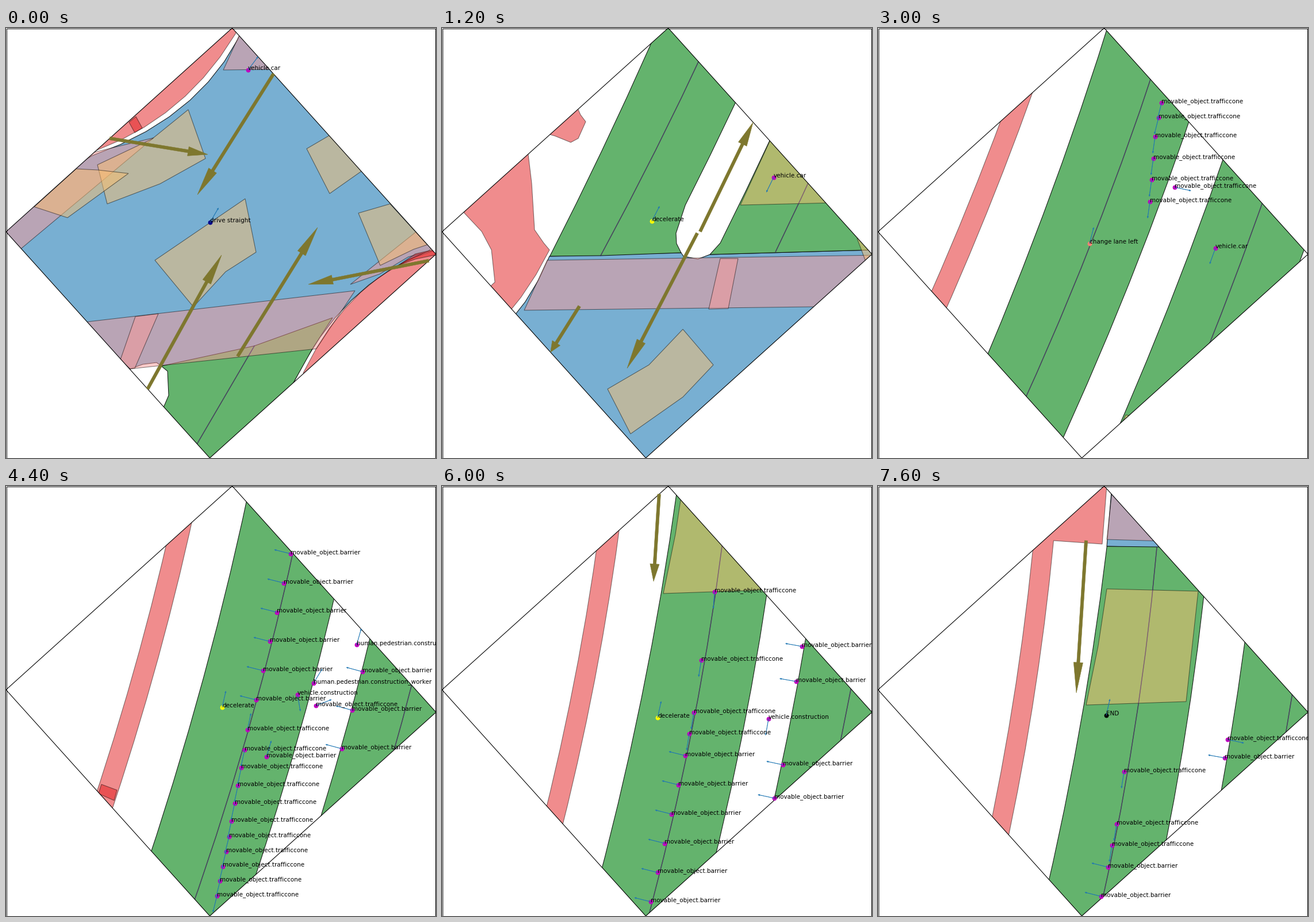
A matplotlib script that plays this animation: 748x748 px, repeating every 7800 ms.

```python
import numpy as np
import matplotlib.pyplot as plt
from matplotlib.animation import FuncAnimation
from matplotlib.colors import to_rgba
from matplotlib.patches import FancyArrow, Polygon, Rectangle
from matplotlib.transforms import Affine2D

SIZE, DPI = 748, 64
PX = 72 / DPI  # points per pixel
FRAMES, STEP = 39, 200

BLUE, GREEN = "#78afd2", "#64b36d"
WALK, CROSS, STOP = "#e31a1c", "#fb9a99", "#fdbf6f"
DIVIDER, SIGNAL, HEADING = "#6a3d9a", "#7e772e", "#1f77b4"

# Map shift and ego position on screen at a few key times
KEYS = np.array([0, 6, 11, 15, 22, 30, 38])
SHIFT = np.array([(0, 0), (-235, 418), (-374, 764), (-460, 1080),
                  (-581, 1637), (-665, 2039), (-688, 2233)], float)
EGO = np.array([(355, 338), (365, 336), (373, 352), (368, 375),
                (376, 385), (375, 403), (397, 399)], float)
ACTIONS = [(0, "drive straight", "darkblue"), (4, "decelerate", "yellow"),
           (9, "change lane left", "salmon"), (18, "decelerate", "yellow"),
           (38, "END", "black")]

DIAMOND = np.array([(393.5, 0), (748, 393.5), (354.5, 748), (0, 354.5)])
EDGES = np.roll(DIAMOND, -1, axis=0) - DIAMOND
NORMALS = np.column_stack([-EDGES[:, 1], EDGES[:, 0]])

fig = plt.figure(figsize=(SIZE / DPI, SIZE / DPI), dpi=DPI, facecolor="white")
ax = fig.add_axes([0, 0, 1, 1])
ax.set_xlim(0, SIZE)
ax.set_ylim(SIZE, 0)
ax.axis("off")

camera = Affine2D()
window = Polygon(DIAMOND, fill=False, ec="black", lw=1.1 * PX, zorder=4)
ax.add_patch(window)
ax.add_patch(Rectangle((0.5, 0.5), SIZE - 1, SIZE - 1, fill=False, ec="black",
                       lw=PX, antialiased=False, zorder=4))


def area(color, *pts):
    """Map polygon in world coordinates, seen only through the window."""
    face, edge = (1, 0.9) if color in (BLUE, GREEN) else (0.5, 0.5)
    patch = Polygon(pts, fc=to_rgba(color, face), ec=(0, 0, 0, edge),
                    lw=1.04 * PX, zorder=1, transform=camera + ax.transData)
    ax.add_patch(patch)
    patch.set_clip_path(window)


def divider(pts):
    x, y = zip(*pts)
    for color, alpha, z in (("black", 0.6, 1), (DIVIDER, 0.5, 1.5)):
        line, = ax.plot(x, y, color=color, alpha=alpha, lw=1.4 * PX, zorder=z,
                        transform=camera + ax.transData)
        line.set_clip_path(window)


def track(line, start, end):
    """Points of a road line x = a + b*s + c*s*s, with s running up the map."""
    a, b, c = line
    s = np.linspace(start, end, 24)
    return list(zip(a + b * s + c * s * s, -s))


def bend(a, b, c):
    """Quadratic Bezier curve from a to c."""
    t = np.linspace(0, 1, 9)[:, None]
    a, b, c = map(np.array, (a, b, c))
    return list((1 - t) ** 2 * a + 2 * t * (1 - t) * b + t * t * c)


# Road lines from left to right
PATH_LEFT = 236.3, 0.5800, -1.132e-4
PATH_RIGHT = 278.2, 0.5742, -1.121e-4
UP_LEFT = 411.8, 0.5142, -9.27e-5
UP_MID = 499.0, 0.5459, -1.0765e-4
UP_RIGHT = 601.2, 0.5304, -1.03e-4
DOWN_LEFT = 696.9, 0.5079, -9.54e-5
DOWN_MID = 801.2, 0.4910, -8.89e-5
DOWN_RIGHT = 900.0, 0.5000, -9.50e-5

# Junctions
area(BLUE, *bend((422, -21), (354, 151), (150, 222)),
     (-60, 350), (120, 600), (216, 593), (238, 585), (262, 582), (270, 588),
     *bend((500, 617), (584, 445), (735, 388)),
     (1040, 100), (985, -32), (701, -24), (680, -16), (655, -21), (651, -27))
area(BLUE, (1086, -2128), (1094, -2223), (1280, -2260), (1290, -2123))

# Roads
area(GREEN, (270, 588), (281, 597), (283, 639), (274, 660), (300, 800),
     (440, 780), (500, 617), (533, 558), (568, 504), (432, 553))
divider([(432, 553), (325, 736)])
area(GREEN, *track(UP_LEFT, 21, 2128), *track(UP_RIGHT, 2126, 110),
     (642, -61), (643, -43), (651, -27), (511, -22))
divider(track(UP_MID, 22, 2126))
area(GREEN, (701, -24), *track(DOWN_LEFT, 44, 2150),
     *track(DOWN_RIGHT, 2150, 330), (1056, -309), (985, -32))
divider(track(DOWN_MID, 29, 2150))

# Crossings
area(CROSS, (142, 511), (607, 457), (540, 558), (216, 593), (120, 560))
area(CROSS, (225, 502), (265, 497), (224, 592), (216, 593), (199, 577))
area(CROSS, (26, 384), (257, 191), (203, 204), (150, 217), (-20, 370))
area(CROSS, (599, 446), (714, 354), (748, 386), (700, 398), (650, 428))
area(CROSS, (418, -14), (1000, -23), (990, 62), (880, 67), (378, 73))
area(CROSS, (719, -17), (750, -17), (733, 70), (699, 71))
area(CROSS, (1086, -2140), (1097, -2240), (1290, -2240), (1290, -2134))

# Pavements
area(WALK, (273, -97), (304, -64), (321, -32), (327, 24), (100, 235),
     *bend((157, 213), (334, 147), (422, -32)),
     (412, -44), (396, -67), (391, -148), (380, -240))
area(WALK, (214, 164), (226, 154), (237, 174), (224, 182))
area(WALK, *bend((517, 600), (601, 427), (748, 386)), (800, 420), (560, 640))
area(WALK, (682, 413), (712, 393), (742, 386), (760, 392), (712, 402))
area(WALK, (415, -235), *track(PATH_LEFT, 351, 2121),
     (990, -2260), (1088, -2260), (1078, -2132),
     *track(PATH_RIGHT, 2138, 467), (548, -456), (540, -435),
     *track(PATH_RIGHT, 441, 322),
     (476, -267), (485, -255), (472, -226), (459, -219), (432, -230))
area(WALK, (747, -1118), (774, -1108), (769, -1090), (742, -1102))

# Stop zones
area(STOP, (317, 142), (347, 227), (268, 271), (176, 306), (159, 238),
     (254, 193))
area(STOP, (49, 311), (122, 245), (160, 247), (213, 253), (107, 330))
area(STOP, (416, 297), (435, 390), (382, 424), (326, 485), (259, 404))
area(STOP, (654, 106), (707, 168), (654, 224), (563, 288), (523, 210),
     (595, 168))
area(STOP, (613, 322), (668, 306), (733, 377), (709, 385), (651, 413))
area(STOP, (891, -407), (1057, -376), (1044, -324), (1000, -116), (754, -110))
area(STOP, (957, -52), (975, -4), (1010, -10), (1000, -60))
area(STOP, (1086, -2054), (1245, -2050), (1224, -1858), (1050, -1852),
     (1071, -1955))

SIGNALS = np.array([
    [(474, 66), (333, 290)], [(150, 187), (351, 220)],
    [(238, 643), (375, 395)], [(403, 571), (542, 347)],
    [(770, 398), (526, 446)], [(679, -61), (557, 174)],
    [(684, -64), (799, -301)], [(1060, -237), (1026, -325)],
    [(1050, -2138), (1033, -1873)]], float)

CAR, BUS, DIGGER = "vehicle.car", "vehicle.bus.rigid", "vehicle.construction"
CONE, BARRIER = "movable_object.trafficcone", "movable_object.barrier"
WORKER = "human.pedestrian.construction_worker"
agents = []


def add(name, turn, start, end=None, n=1, speed=(0, 0), until=FRAMES):
    """One agent, or an even row of n from start to end."""
    for p in np.linspace(start, end or start, n):
        agents.append((name, turn, p, np.array(speed), until))


add(CAR, 53, (421, 73), speed=(40, -80))
add(CAR, 244, (812, -158.5))
add(BUS, 246, (933, -413))
add(CAR, 250, (1047, -697))
add(CONE, 262, (933, -778), (942, -891), 4)
add(CONE, 256, (948, -924), (969, -1027), 5)
add(CONE, 258, (973, -1054), (996, -1178), 5)
add(CONE, 78, (1001, -1213))
add(CONE, -12, (976, -803))
add(CONE, 21, (1120, -1255))
add(BARRIER, 73, (1034, -1166))
add(WORKER, 74, (1191, -1361))
add(WORKER, 59, (1116, -1294))
add(DIGGER, 280, (1088, -1274))
add(BARRIER, 166, (1016, -1265), (1088, -1570), 7)
add(BARRIER, 165, (1165, -1180), (1201, -1314), 3)
add(BARRIER, 168, (1243, -1496), (1258, -1554), 2)
add(BARRIER, 170, (1281, -1699), (1291, -1760), 2)
add(DIGGER, 260, (1233, -1634))
add(CONE, 261, (1095, -1608), (1103, -1645), 2)
add(CONE, 261, (1116, -1736))
add(CONE, 266, (1139, -1855), until=34)
add(CONE, -12, (1296, -1792))


def glide(values, t):
    """Cubic Hermite curve through the key values."""
    slope = np.gradient(values, KEYS, axis=0)
    i = np.clip(np.searchsorted(KEYS, t, side="right") - 1, 0, len(KEYS) - 2)
    h = KEYS[i + 1] - KEYS[i]
    u = (t - KEYS[i]) / h
    return ((1 + 2 * u) * (1 - u) ** 2 * values[i]
            + u * (1 - u) ** 2 * h * slope[i]
            + u * u * (3 - 2 * u) * values[i + 1]
            + u * u * (u - 1) * h * slope[i + 1])


def inside(p):
    return np.all(np.sum(NORMALS * (p - DIAMOND), axis=1) >= 0)


def clip(a, b):
    """Part of segment a-b within the window, or None."""
    lo, hi = 0.0, 1.0
    for n, p in zip(NORMALS, DIAMOND):
        dist, rate = n @ (a - p), n @ (b - a)
        if rate > 0:
            lo = max(lo, -dist / rate)
        elif rate < 0:
            hi = min(hi, -dist / rate)
        elif dist < 0:
            return None
    return (a + lo * (b - a), a + hi * (b - a)) if lo < hi else None


moving = []


def arrow(a, d, color, zorder, **shape):
    moving.append(ax.add_patch(FancyArrow(
        *a, *d, length_includes_head=True, color=color, lw=0.5 * PX,
        zorder=zorder, **shape)))


def mark(p, turn, name, color):
    moving.extend(ax.plot(*p, "o", color=color, ms=6.8 * PX,
                          mew=1.04 * PX, zorder=5))
    arrow(p, 29 * np.array([np.cos(turn), -np.sin(turn)]), HEADING, 6,
          width=0.5, head_width=2.6, head_length=3)
    moving.append(ax.text(*p, name, family="DejaVu Sans", size=10.42 * PX,
                          color="black", zorder=7))


def update(frame):
    for artist in moving:
        artist.remove()
    moving.clear()
    shift = glide(SHIFT, frame)
    camera.clear().translate(*shift)

    for a, b in SIGNALS:
        part = clip(a + shift, b + shift)
        if part:
            d = part[1] - part[0]
            arrow(part[0], d, SIGNAL, 4.5, width=5.4, head_width=16.2,
                  head_length=0.2 * np.hypot(*d))

    for name, turn, home, speed, until in agents:
        p = home + speed * frame + shift
        if frame < until and inside(p):
            mark(p, np.radians(turn), name, "m")

    # The ego faces along its own path over the map
    dx, dy = glide(EGO - SHIFT, frame + 0.5) - glide(EGO - SHIFT, frame - 0.5)
    _, action, color = [a for a in ACTIONS if a[0] <= frame][-1]
    mark(glide(EGO, frame), np.arctan2(-dy, dx), action, color)
    return moving


anim = FuncAnimation(fig, update, frames=FRAMES, interval=STEP,
                     repeat=True, repeat_delay=0, blit=False)
plt.show()
```
